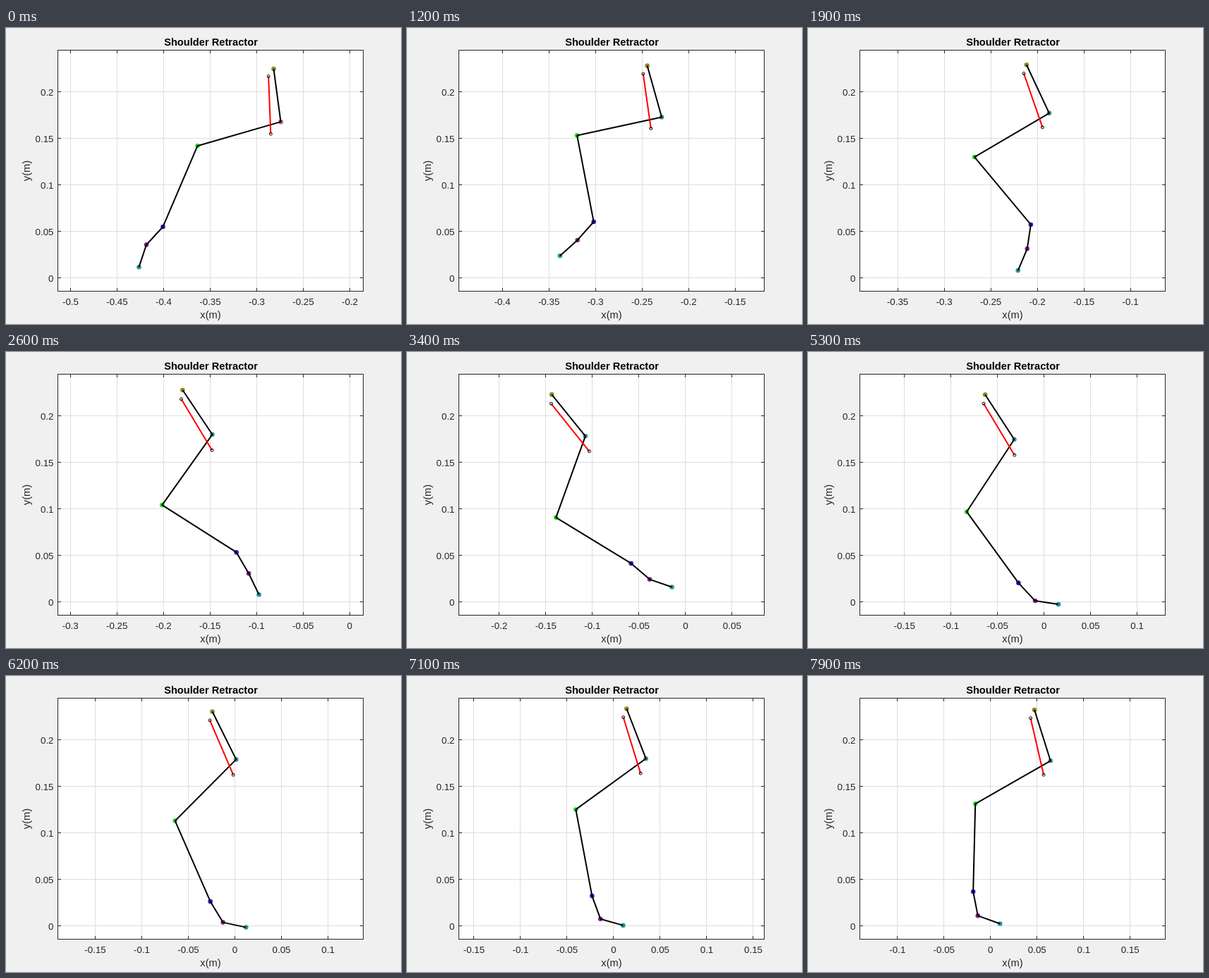
Write an HTML page with a canvas that moves like this. It is 560 px wide and 420 px high and loops after 8 s.

```html
<!DOCTYPE html>
<html lang="en">
<head>
<meta charset="utf-8">
<title>Shoulder Retractor</title>
<style>
html, body { margin: 0; width: 100%; height: 100%; overflow: hidden; background: #f0f0f0; }
canvas { display: block; }
</style>
</head>
<body>
<canvas id="stage" width="560" height="420"></canvas>
<script>
const ctx = document.getElementById('stage').getContext('2d');
const BOX = { left: 73.5, right: 506.5, top: 31.5, bottom: 373.5 };
const CENTER = 290, ZERO_Y = 354.5, TICK = 66; // one tick = 0.05 m
const FONT = '"Liberation Sans", Arial, sans-serif';
const LENGTHS = [75.8, 122.8, 124.8, 34.7, 33.4];
const TEAL = '#2a9696';

// step, shoulder blade x and y in pixels, then the direction of each bone in degrees
const POSES = [
  [0, -372, 58, 82.4, 163.9, 113.1, 132.7, 108.4],
  [4, -347.3, 55.3, 78.5, 168, 98, 135, 128],
  [8, -322.5, 53.5, 74.3, 167.8, 79.1, 131.5, 138],
  [22, -236.8, 54, 56.3, 125.4, 32.5, 59.7, 64.2],
  [28, -201.5, 58.5, 52, 112.5, 30.5, 43, 26],
  [38, -142.5, 67.5, 49.8, 107.1, 40.8, 42.9, 12.1],
  [49, -83.5, 60.5, 57, 123.3, 54, 47.1, 8.6],
  [58, -32, 50.5, 63.6, 134.8, 66.4, 58.9, 12.1],
  [75, 62.2, 48, 72.5, 150.2, 91.4, 79, 19.9]
];

// Slope at pose i of the parabola through it and its neighbours
function slope(i, col) {
  const j = Math.min(Math.max(i, 1), POSES.length - 2);
  const [a, b, c] = [POSES[j - 1], POSES[j], POSES[j + 1]];
  const before = (b[col] - a[col]) / (b[0] - a[0]);
  const after = (c[col] - b[col]) / (c[0] - b[0]);
  const bend = (after - before) / (c[0] - a[0]);
  return before + bend * (b[0] - a[0]) + 2 * bend * (POSES[i][0] - b[0]);
}

function poseAt(step) {
  let i = 0;
  while (i < POSES.length - 2 && step >= POSES[i + 1][0]) i++;
  const a = POSES[i], b = POSES[i + 1], h = b[0] - a[0];
  const s = (step - a[0]) / h, r = 1 - s;
  return a.slice(1).map((v, k) => {
    const col = k + 1;
    return v * r * r * (1 + 2 * s) + b[col] * s * s * (3 - 2 * s)
      + h * s * r * (r * slope(i, col) - s * slope(i + 1, col));
  });
}

function polar([x, y], length, degrees) {
  const a = degrees * Math.PI / 180;
  return [x + length * Math.cos(a), y + length * Math.sin(a)];
}

function polyline(points, color, width) {
  ctx.beginPath();
  points.forEach(p => ctx.lineTo(...p));
  ctx.strokeStyle = color;
  ctx.lineWidth = width;
  ctx.stroke();
}

function circle([x, y], radius) {
  ctx.beginPath();
  ctx.arc(x, y, radius, 0, 2 * Math.PI);
}

function text(str, x, y, size, align = 'center', color = '#262626', weight = '') {
  ctx.font = `${weight} ${size}px ${FONT}`;
  ctx.textAlign = align;
  ctx.fillStyle = color;
  ctx.fillText(str, x, y);
}

const tickLabel = k => String(+(k * 0.05).toFixed(2));

function drawAxes(zeroX) {
  const { left, right, top, bottom } = BOX;
  ctx.fillStyle = '#f0f0f0';
  ctx.fillRect(0, 0, 560, 420);
  ctx.fillStyle = '#fff';
  ctx.fillRect(left, top, right - left, bottom - top);

  const ticks = [];
  for (let k = Math.ceil((left - zeroX) / TICK); zeroX + k * TICK <= right; k++) {
    const x = Math.floor(zeroX + k * TICK) + 0.5;
    polyline([[x, top], [x, bottom]], '#dedede', 1);
    ticks.push([[x, bottom], [x, bottom - 4.5]], [[x, top], [x, top + 4.5]]);
    text(tickLabel(k), zeroX + k * TICK, 393, 13.33);
  }
  for (let k = 0; k < 5; k++) {
    const y = ZERO_Y - k * TICK;
    polyline([[left, y], [right, y]], '#dedede', 1);
    ticks.push([[left, y], [left + 4.5, y]], [[right, y], [right - 4.5, y]]);
    text(tickLabel(k), 67.5, y + 5.5, 13.33, 'right');
  }
  ticks.forEach(t => polyline(t, '#262626', 1));
  ctx.strokeRect(left, top, right - left, bottom - top);

  text('Shoulder Retractor', CENTER + 0.5, 25, 14.67, 'center', '#000', 'bold');
  text('x(m)', CENTER, 412, 14.67);
  ctx.save();
  ctx.translate(34, 202.5);
  ctx.rotate(-Math.PI / 2);
  text('y(m)', 0, 0, 14.67);
  ctx.restore();
}

function draw(step) {
  const [x, y, ...angles] = poseAt(step);
  const limb = [[x, y]];
  angles.forEach((a, i) => limb.push(polar(limb[i], LENGTHS[i], a)));
  const muscle = [polar(limb[0], 12.9, angles[0] + 42.5), polar(limb[1], 22.2, angles[1] - 34.2)];

  // The view is centred on the horizontal extent of the limb
  const xs = [...limb, ...muscle, [limb[1][0] + 2]].map(p => p[0]);
  const zeroX = CENTER - (Math.min(...xs) + Math.max(...xs)) / 2;
  drawAxes(zeroX);

  ctx.save();
  ctx.translate(zeroX, 0);
  const colors = ['#8f8a28', step ? TEAL : '#e04848', '#22e022', '#2424d0', '#852a85', TEAL];
  limb.forEach((p, i) => {
    circle(p, 3.3);
    ctx.fillStyle = colors[i];
    ctx.fill();
  });
  circle(limb[1], 1.8);
  ctx.fillStyle = step ? '#c06060' : TEAL;
  ctx.fill();
  ctx.lineJoin = 'round';
  polyline(limb, '#000', 2);
  polyline(muscle, '#f00', 2);
  ctx.strokeStyle = '#000';
  ctx.lineWidth = 1;
  muscle.forEach(p => { circle(p, 2); ctx.stroke(); });
  ctx.restore();
}

function frame() {
  const t = performance.now() % 8000;
  draw(Math.max(0, Math.floor(t / 100) - 4));
  requestAnimationFrame(frame);
}
frame();
</script>
</body>
</html>
```
